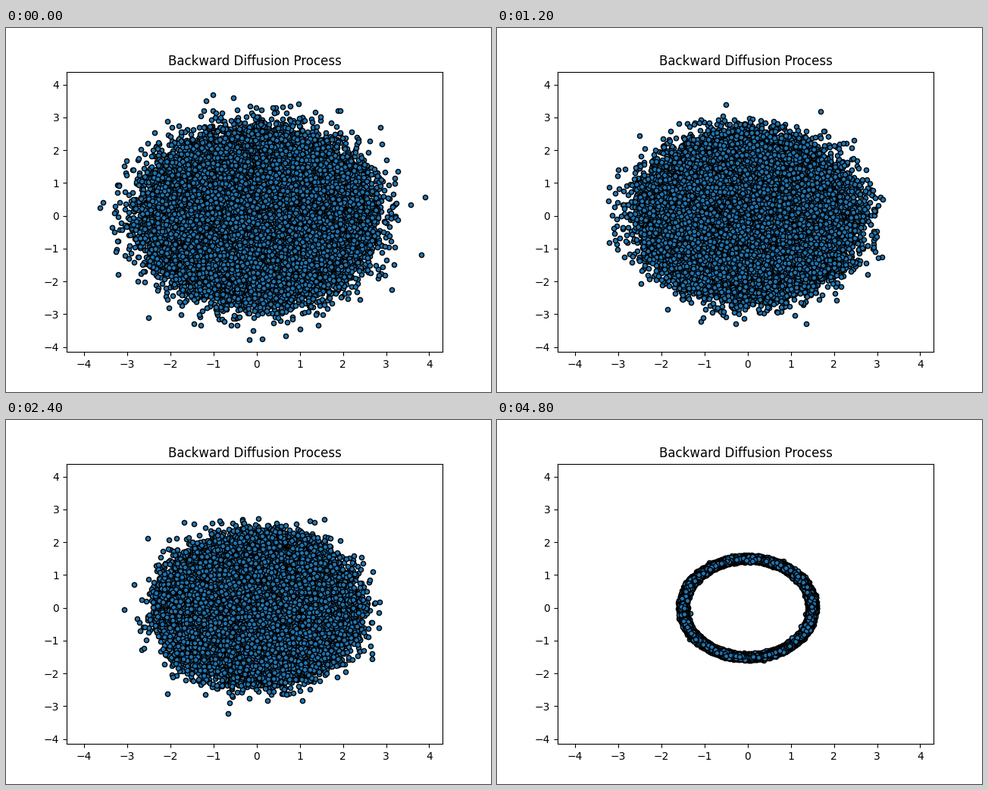
Write a matplotlib script that moves like this. It is 640 px wide and 480 px high and loops after 5000 ms.

```python
import numpy as np
import matplotlib.pyplot as plt
from matplotlib.animation import FuncAnimation

FRAMES = 25
POINTS = 60000
RADIUS = 1.5

rng = np.random.default_rng(7)

# A linear noise rate gives a quadratic exponent for the remaining signal.
time_left = 1 - np.arange(FRAMES) / FRAMES
signal = np.exp(-(0.004 * time_left + 0.66 * time_left ** 2) / 2)


def diffuse(points, keep):
    """Shrink the points by keep and add the matching Gaussian noise."""
    return keep * points + np.sqrt(1 - keep ** 2) * rng.standard_normal(points.shape)


def backward_path():
    """Diffuse a ring step by step, then return the steps in reverse."""
    angle = rng.uniform(0, 2 * np.pi, POINTS)
    ring = RADIUS * np.column_stack([np.cos(angle), np.sin(angle)])
    steps = [diffuse(ring, signal[-1])]
    for k in range(FRAMES - 1, 0, -1):
        steps.append(diffuse(steps[-1], signal[k - 1] / signal[k]))
    return steps[::-1]


path = backward_path()

plt.rcParams["font.family"] = "DejaVu Sans"
fig, ax = plt.subplots(figsize=(6.4, 4.8), dpi=100)
ax.set_xlim(-4.403, 4.308)
ax.set_ylim(-4.15, 4.395)
ax.set_title("Backward Diffusion Process")
dots = ax.scatter(*path[0].T, s=20, color="#1f77b4", edgecolor="black", linewidth=1)


def update(frame):
    dots.set_offsets(path[frame])
    return dots,


anim = FuncAnimation(fig, update, frames=FRAMES, interval=200, repeat=True)
plt.show()
```
